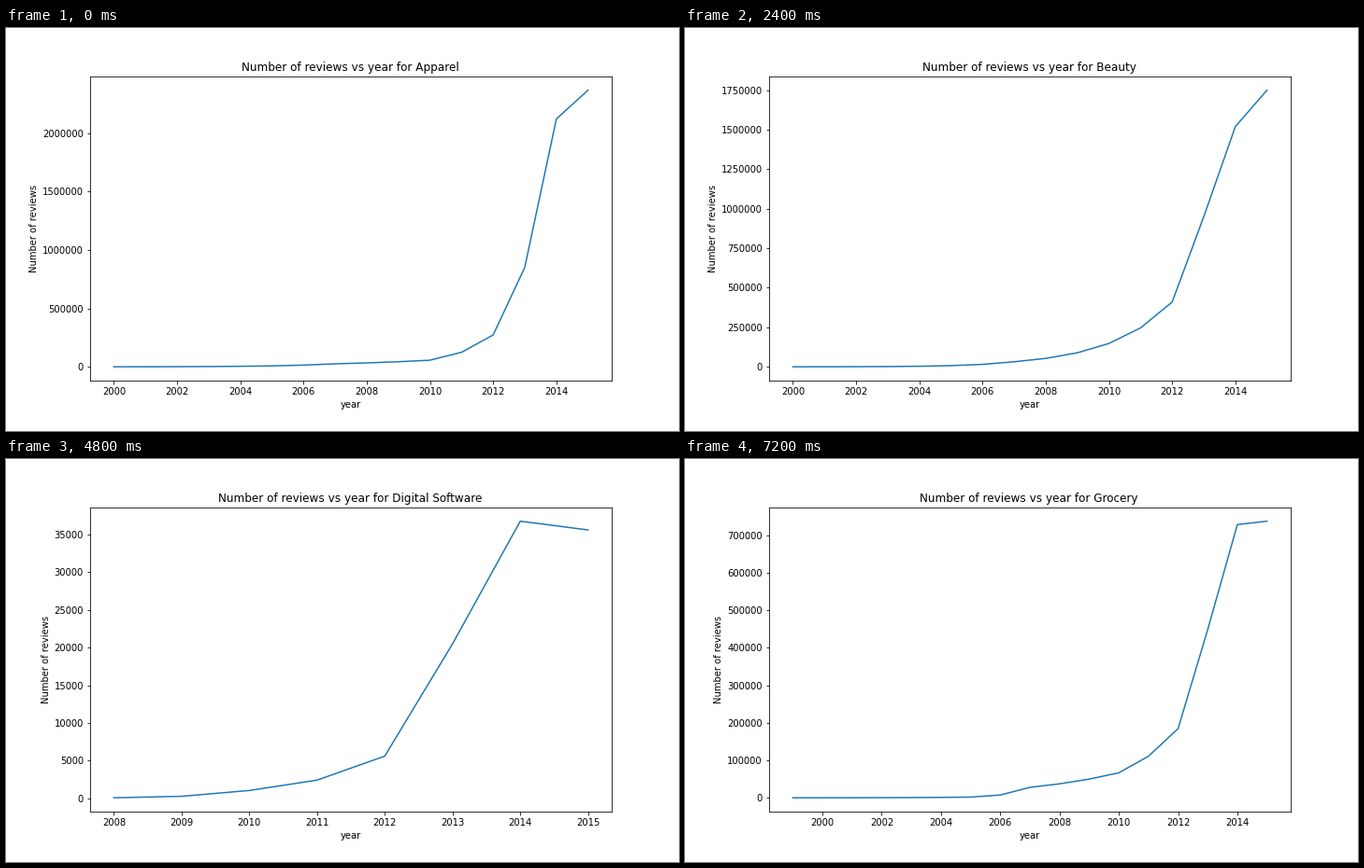
A matplotlib script that plays this animation: 720 px wide and 432 px high, repeating every 8000 ms.

```python
import matplotlib.pyplot as plt
import numpy as np
from matplotlib.animation import FuncAnimation

# Category, key points (year: thousands of reviews) joined by steady
# percentage growth up to 2012, then the boom years 2013 to 2015.
CHARTS = [
    ("Apparel", {2000: 0.5, 2007: 26, 2010: 57, 2012: 273}, (852, 2122, 2368)),
    ("Automotive", {1999: 0.3, 2007: 15, 2012: 285}, (650, 1065, 1180)),
    ("Baby", {1999: 0.2, 2002: 6.5, 2005: 19.2, 2006: 13.5, 2012: 142},
     (315, 477, 503.8)),
    ("Beauty", {2000: 0.2, 2007: 32, 2012: 410}, (950, 1520, 1750)),
    ("Books", {1995: 0.9, 1997: 37, 2000: 541, 2001: 448, 2004: 443, 2006: 565,
               2007: 755, 2011: 1280, 2012: 1616}, (2908, 3474, 2812)),
    ("Digital Ebook Purchase", {1999: 0.01, 2007: 1, 2012: 1507},
     (4465, 6618, 4535)),
    ("Digital Software", {2008: 0.07, 2010: 1.04, 2012: 5.6},
     (20.5, 36.78, 35.62)),
    ("Digital Video Download", {2000: 0.05, 2010: 4, 2012: 143},
     (723, 1563, 1593.4)),
    ("Digital Video Games", {2006: 0.05, 2009: 0.9, 2012: 17}, (27, 39, 45)),
    ("Grocery", {1999: 0.1, 2005: 2, 2007: 28, 2010: 66.7, 2012: 184.7},
     (449, 729, 738)),
]
TITLE_X = 0.5 - 1 / 558  # one pixel left of the axes centre

plt.rcParams["font.family"] = "DejaVu Sans"
fig, ax = plt.subplots(figsize=(10, 6), dpi=72)
fig.subplots_adjust(left=0.125, right=0.9, bottom=0.125, top=0.88)


def review_counts(keys, boom):
    key_years = list(keys)
    years = np.arange(key_years[0], 2016)
    growth = np.exp(np.interp(years[:-3], key_years, np.log(list(keys.values()))))
    return years, 1000 * np.append(growth, boom)


def draw(i):
    name, keys, boom = CHARTS[i]
    ax.clear()
    ax.plot(*review_counts(keys, boom), color="#1f77b4", lw=1.5)
    ax.set_title(f"Number of reviews vs year for {name}", x=TITLE_X)
    ax.set_xlabel("year")
    ax.set_ylabel("Number of reviews")
    ax.ticklabel_format(style="plain", useOffset=False)
    return ax.get_children()


anim = FuncAnimation(fig, draw, frames=len(CHARTS), interval=800,
                     init_func=lambda: draw(0), repeat=True, repeat_delay=0)
plt.show()
```
